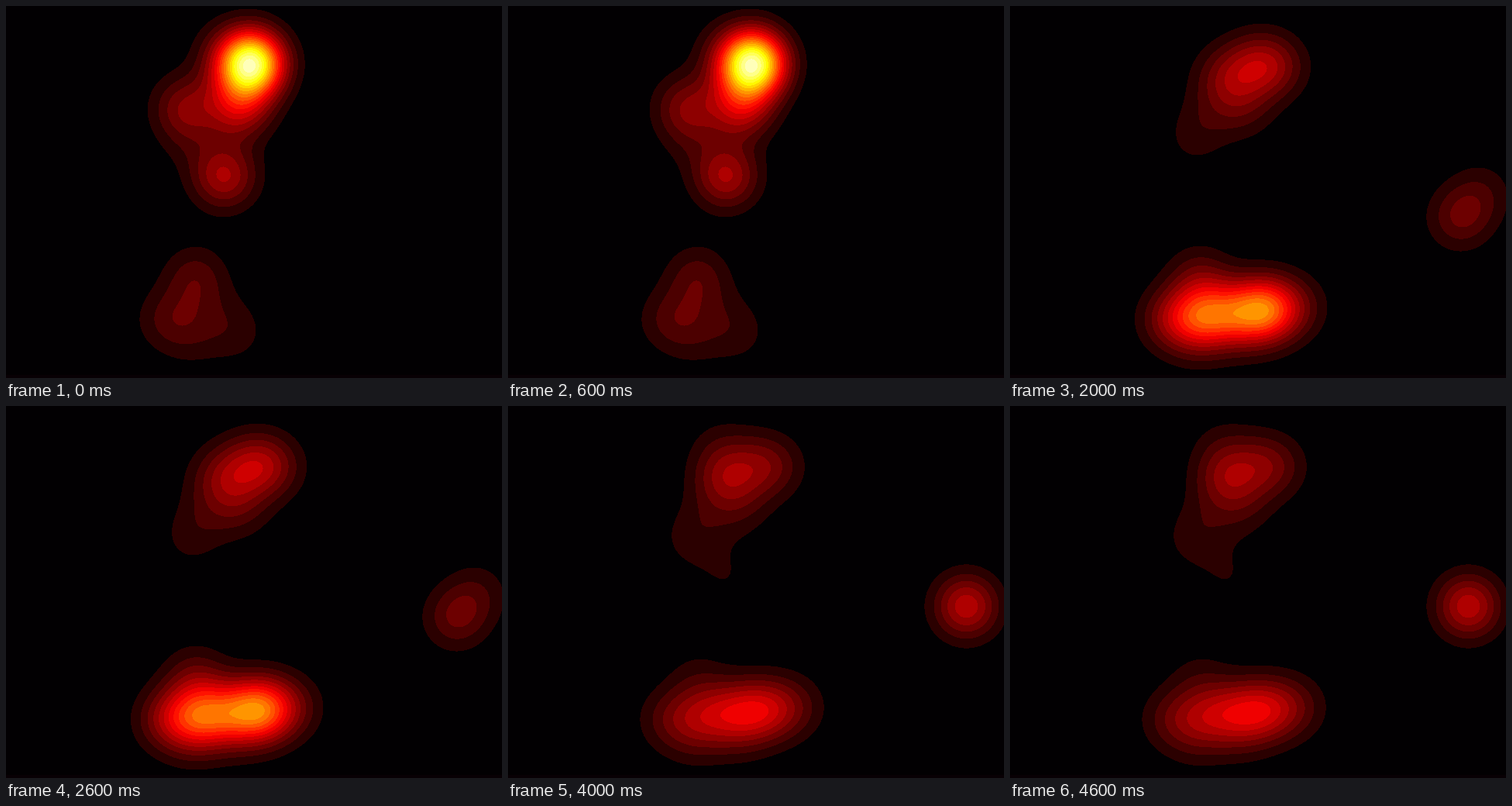
Recreate the animation shown at these times as an HTML page with a canvas. Size 640 px wide and 480 px high, loop 5000 ms.

```html
<!DOCTYPE html>
<html lang="en">
<head>
<meta charset="utf-8">
<title>Density heat map</title>
<style>
  html, body { margin: 0; width: 100%; height: 100%; overflow: hidden; background: #000; }
  canvas { display: block; width: 640px; height: 480px; }
</style>
</head>
<body>
<canvas id="stage" width="640" height="480"></canvas>
<script>
const WIDTH = 640, HEIGHT = 480, PLOT_HEIGHT = 476;
const HOLD = 1000, LEVELS = 20, SIGMA = 29;
const ctx = document.getElementById("stage").getContext("2d");

// Fixed places whose heat rises and falls from scene to scene.
const sites = {
  head: [315, 74], face: [342, 78], crown: [272, 52], brow: [278, 92], neck: [300, 130],
  chest: [254, 138], arm: [230, 130], hip: [237, 171], foot: [281, 219],
  sideLow: [580, 273], side: [591, 258], sideHigh: [608, 241],
  crest: [244, 350], base: [240, 432], floor: [298, 424]
};
// The lower patch lies along an evenly spaced, slightly rising row.
const rowSite = i => [208 + 40 * i, 404 - 4 * i];

// Black, red, yellow, white ramp.
function heatColor(level) {
  if (level < 1) return [2, 0, 2];
  const t = level / (LEVELS + 0.4);
  const ramp = (from, to) => 255 * Math.max(0, Math.min(1, (t - from) / (to - from)));
  return [Math.min(255, 10.6 + t * 669.4), ramp(0.365, 0.746), ramp(0.746, 1)];
}
const palette = Array.from({ length: LEVELS + 1 }, (_, level) => heatColor(level));

const bell = (length, center) =>
  Float64Array.from({ length }, (_, i) => Math.exp(-((i - center) ** 2) / (2 * SIGMA * SIGMA)));

function addHeat(field, [x, y], height) {
  const across = bell(WIDTH, x), down = bell(PLOT_HEIGHT, y);
  for (let row = 0, i = 0; row < PLOT_HEIGHT; row++) {
    const scale = height * down[row];
    for (let col = 0; col < WIDTH; col++) field[i++] += scale * across[col];
  }
}

function paint(rowHeights, siteHeights) {
  const field = new Float64Array(WIDTH * PLOT_HEIGHT);
  rowHeights.forEach((height, i) => addHeat(field, rowSite(i), height));
  for (const name in siteHeights) addHeat(field, sites[name], siteHeights[name]);

  const picture = new ImageData(WIDTH, HEIGHT);
  for (let i = 0; i < WIDTH * HEIGHT; i++) {
    const color = i < field.length ? palette[Math.min(LEVELS, Math.floor(field[i]))] : [8, 0, 4];
    picture.data.set([...color, 255], i * 4);
  }
  return picture;
}

const scenes = [
  paint([2, 0.8, 0.5], {
    head: 18.5, crown: 0.8, brow: 0.5, neck: 5.5, arm: 3.6, hip: 1.1, foot: 5.1,
    crest: 2.5, base: 0.8, floor: 1.1
  }),
  paint([2.9, 8, 2.2, 7.4, 3.4], {
    head: 17, neck: 1.2, chest: 3.7, foot: 1.9,
    crest: 2.5, base: 1.6, floor: 1.3
  }),
  paint([3.5, 7, 5, 9.4, 2.2], {
    head: 2.9, face: 3, brow: 3, neck: 2, chest: 0.8, hip: 1.1,
    sideLow: 2.9, sideHigh: 1.6, crest: 2.5, base: 0.8, floor: 0.5
  }),
  paint([1.3, 4.2, 4, 7, 4.3], {
    head: 10.8, face: 1.3, crown: 1.7, brow: 0.5, neck: 0.7, chest: 0.8, hip: 3.6, foot: 1.4,
    sideLow: 1.8, sideHigh: 2.6, crest: 2.2, base: 1.2, floor: 0.5
  }),
  paint([2.1, 2.8, 3.8, 4.8, 2.2], {
    head: 1.7, face: 2.3, crown: 1, brow: 3.3, neck: 1.4, chest: 0.6, hip: 1.3, foot: 0.9,
    side: 5.7, crest: 1.1, base: 0.9, floor: 0.8
  })
];

const start = performance.now();
let shown = -1;

function render() {
  const index = Math.floor((performance.now() - start) / HOLD) % scenes.length;
  if (index !== shown) {
    ctx.putImageData(scenes[index], 0, 0);
    shown = index;
  }
  requestAnimationFrame(render);
}
render();
</script>
</body>
</html>
```
